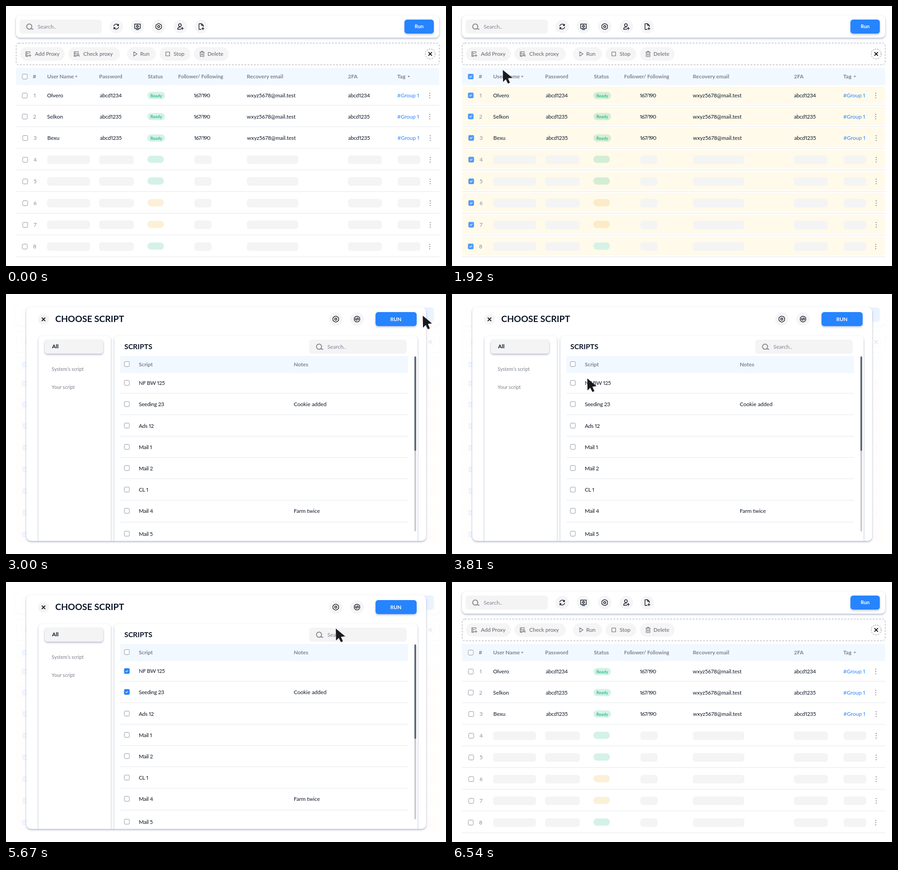
These frames come from a looping animation (974x575 px, 6750 ms). An HTML page:

```html
<!DOCTYPE html>
<html lang="en">
<head>
<meta charset="utf-8">
<title>Account table</title>
<style>
html, body { margin: 0; width: 100%; height: 100%; overflow: hidden; background: #fff; }
svg { display: block; width: 974px; height: 575px; font-family: Lato, "Open Sans", sans-serif; font-variant-numeric: proportional-nums; }
.card { filter: drop-shadow(0 2px 2px rgba(60, 78, 140, .42)); }
.btn { filter: drop-shadow(0 2px 2px rgba(50, 80, 150, .35)); }
.ico { fill: none; stroke: #101828; stroke-width: 1.4; stroke-linecap: round; stroke-linejoin: round; }
.thin { stroke: #5b6270; stroke-width: 1.1; }
.thick { stroke-width: 2; }
.tint { mix-blend-mode: multiply; }
</style>
</head>
<body>
<svg id="stage" viewBox="0 0 974 575"></svg>
<script>
const INK = '#0b1628', GREY = '#7b8494', SOFT = '#f4f4f4', BLUE = '#2684ff', HEAD = '#f2f8ff';

// Drawing helpers
const rect = (x, y, w, h, r, fill, more = '') =>
  `<rect x="${x}" y="${y}" width="${w}" height="${h}" rx="${r}" fill="${fill}" ${more}/>`;
const text = (x, y, s, size = 12, fill = INK, more = '') =>
  `<text x="${x}" y="${y + size * .35}" font-size="${size}" fill="${fill}" ${more}>${s}</text>`;
const bold = (x, y, s, size, fill, more = '') => text(x, y, s, size, fill, 'font-weight="700" ' + more);
const circle = (x, y, r, fill, more = '') => `<circle cx="${x}" cy="${y}" r="${r}" fill="${fill}" ${more}/>`;
const line = (x1, x2, y) => `<path d="M${x1} ${y}H${x2}" stroke="#e4e6ea"/>`;
const icon = (x, y, d, cls = '') => `<path class="ico ${cls}" transform="translate(${x} ${y})" d="${d}"/>`;
const box = (x, y) => rect(x - 5.5, y - 5.5, 11, 11, 2, '#fff', 'stroke="#8d949e"');
const tick = (x, y, fill) => rect(x - 6, y - 6, 12, 12, 2, fill) +
  `<path d="M${x - 2.6} ${y}l1.9 1.8 3.3-3.5" fill="none" stroke="#fff" stroke-width="1.2"/>`;
const ring = (r, x = 0, y = 0) => `M${x - r} ${y}a${r} ${r} 0 1 0 ${2 * r} 0a${r} ${r} 0 1 0 ${-2 * r} 0`;
const arrow = x => `<path d="M${x} 154.5h5l-2.5 3.5z" fill="${GREY}"/>`;
const MID = 'text-anchor="middle"', TIGHT = 'letter-spacing="-.25"';

const GEAR = 'M-1.6-6.2Q0-7 1.6-6.2L5-4.2Q6.3-3.3 6.3-1.8V1.8Q6.3 3.3 5 4.2L1.6 6.2Q0 7-1.6 6.2L-5 4.2Q-6.3 3.3-6.3 1.8V-1.8Q-6.3-3.3-5-4.2Z' + ring(2.3);
const CROSS = 'M-3.4-3.4L3.4 3.4M3.4-3.4L-3.4 3.4';
const SERVER = 'M4-5H-5V-1H2M-5-1V3.5H2M-5 3.5V5.5H0M-3-3h1M-3 1.2h1';
const search = (x, y) => `<path d="${ring(5.7, x - .5, y)}M${x + 3} ${y + 4.7}l5 1" fill="none" stroke="#868b95" stroke-width="2" stroke-linecap="round"/>` +
  text(x + 18, y + .5, 'Search..', 12, GREY);

// Toolbar
const tools = [
  [244, 'M-5.4-1.2A5.5 5.5 0 0 1 4.8-2.6M5.2-5.2V-2.3H2.3M5.4 1.2A5.5 5.5 0 0 1-4.8 2.6M-5.2 5.2V2.3H-2.3'],
  [291, 'M-6.3-5.5H6.3V4H-6.3ZM-3 6.5H3' + ring(1.9, 0, -.8) + 'M0-3.6V-2.8M0 1.2V2M-2.6-.8h-.5M2.6-.8h.5'],
  [338, GEAR],
  [386, ring(3.1, -1, -3.2) + 'M1 6H-6C-6 1-2 1 0 1.4M4.2 1.5V6.5M1.7 4H6.7'],
  [432, 'M0 6.3H-4.7V-6.3H1.2L4.8-2.8V0M1-6V-2.5H4.6M3.8 2V7M1.3 4.5H6.3']
];
const actions = [
  [31, 99, 64, 'Add Proxy', SERVER + 'M4 1V6M1.5 3.5H6.5M4-5V-2'],
  [138, 114, 171, 'Check proxy', SERVER + ring(2, 3.5, 2) + 'M5 3.6L6.5 5.2M4-5V-2'],
  [268, 64, 297, 'Run', 'M-3.2-4.8L4 0-3.2 4.8Z'],
  [340, 68, 371, 'Stop', 'M-4.2-4.2H4.2V4.2H-4.2Z'],
  [416, 77, 446, 'Delete', 'M-5-3.8H5M-2-3.8V-5.6H2V-3.8M-4-3.8V5.8H4V-3.8M-1.4-1V3.2M1.4-1V3.2']
];
const bar = rect(22, 21, 937, 49, 9, '#fff', 'class="card"') + rect(30, 30, 182, 31, 6, SOFT) + search(52, 45.5) +
  tools.map(([x, d]) => circle(x, 45.5, 15, '#f5f5f5') + icon(x, 45.5, d)).join('') +
  rect(882, 30, 65, 31, 6, BLUE, 'class="btn"') + bold(914.5, 45.5, 'Run', 11, '#fff', MID) +
  rect(22.5, 82, 936.5, 48, 6, 'none', 'stroke="#9a9da3" stroke-dasharray="4 3"') +
  actions.map(([x, w, tx, s, d]) => rect(x, 91, w, 30, 15, '#f5f5f5') + icon(x + 18, 106, d, 'thin') + text(tx, 106, s, 12, '#5b6270')).join('') +
  circle(939, 106, 11, '#fff', 'stroke="#777" stroke-dasharray="3 2.4"') + icon(939, 106, CROSS, 'thick');

// Account table
const rows = [198, 244.5, 292, 340, 388, 436, 484, 532];
const edges = [175, 219.5, 267, 315, 362.5, 410.5, 458.5, 506.5, 554.5];
const people = [['Olvero', 'abcd1234'], ['Selkon', 'abcd1235'], ['Bexu', 'abcd1235']];
const shift = i => i > 1 && i < 7 ? 1 : 0;
const titles = [[59, '#'], [91, 'User Name'], [206, 'Password'], [314, 'Status'], [381, 'Follower/ Following', 11.3],
  [533, 'Recovery email'], [757, '2FA'], [866, 'Tag']];
const bones = [[91, 95], [206, 77], [417, 38], [533, 114], [757, 75], [867, 50]];

function accountRow(y, i) {
  const dx = shift(i), p = people[i];
  let s = line(22, 959, edges[i + 1]) + box(41.5 + dx, y) + text(63.5 + dx, y, i + 1, 12, '#858c97', MID);
  for (const k of [-5, 0, 5]) s += circle(938 + dx, y + k, 1.1, '#6d7480');
  if (!p) {
    s += bones.map(([x, w]) => rect(x, y - 9.5, w, 19, 6, SOFT)).join('');
    return s + rect(313, y - 9, 36.5, 16, 8, i == 5 || i == 6 ? '#fcf0d8' : '#d5f2e8', i < 7 ? 'class="tint"' : '');
  }
  const x = i == 2 ? .5 : 0;
  return s + text(91 + x, y, p[0]) + text(207.5 + x, y, p[1], 12, INK, TIGHT) +
    rect(313, y - 8, 39, 16, 8, '#d5f2e8', 'class="tint"') + bold(332.5, y + .3, 'Ready', 9.5, '#35bd8d', MID) +
    text(433.5 + x, y, '167/190', 12, INK, MID + ' letter-spacing="-.9"') + text(533 + x, y, 'wxyz5678@mail.test') +
    text(757 + x, y, p[1], 12, INK, TIGHT) + text(866 + x, y, '#Group 1', 12, BLUE);
}
const yellow = rows.map((_, i) => rect(22, edges[i] + 3, 937, edges[i + 1] - edges[i] - 6, 6, '#fffaea')).join('');
const ticks = tick(41.5, 156, '#4e9bff') + rows.map((y, i) => tick(41.5 + shift(i), y - .5, '#4e9bff')).join('');
const table = rect(22, 137, 937, 38, 0, HEAD) + box(41.5, 156) +
  titles.map(([x, s, size = 12]) => bold(x, 156, s, size, GREY)).join('') + arrow(153) + arrow(889) +
  `<g id="yellow">${yellow}</g>` + rows.map(accountRow).join('') + `<g id="ticks">${ticks}</g>`;

// Script dialog
const scripts = [['NF BW 125', 197], ['Seeding 23', 244, 'Cookie added'], ['Ads 12', 291.5], ['Mail 1', 338.5],
  ['Mail 2', 385.5], ['CL 1', 433], ['Mail 4', 480, 'Farm twice'], ['Mail 5', 530.5]];
const dividers = [219.5, 267, 314.5, 361.5, 408.5, 456, 504.5];
const dialog = rect(0, 0, 974, 575, 0, '#fff', 'opacity=".9"') + rect(45, 29, 885, 517, 10, '#fff', 'class="card"') +
  '<clipPath id="clip"><rect x="45" y="29" width="885" height="517" rx="10"/></clipPath><g clip-path="url(#clip)">' +
  circle(83, 56, 12, '#f5f5f5') + icon(83, 56, CROSS, 'thick') + bold(109, 55.5, 'CHOOSE SCRIPT', 19.6, INK) +
  circle(730, 55.5, 15, '#f5f5f5') + icon(730, 55.5, GEAR) + circle(777, 55.5, 15, '#f5f5f5') +
  icon(777, 55.5, ring(6.3) + 'M-2-2L-4 0-2 2M2-2L4 0 2 2M.8-2.8L-.8 2.8') +
  rect(818, 40, 91, 31, 6, BLUE, 'class="btn"') + bold(863, 55.5, 'RUN', 11.5, '#fff', MID) +
  rect(72, 93, 160, 480, 8, '#fff', 'class="card"') + rect(240, 93, 671, 480, 8, '#fff', 'class="card"') +
  rect(86, 101, 129, 31, 6, SOFT, 'class="card"') + bold(102, 116, 'All', 12, INK) +
  text(101, 166.5, 'System’s script', 11, '#7d838d') + text(101, 206.5, 'Your script', 11, '#7d838d') +
  bold(262, 116.5, 'SCRIPTS', 15.8, INK) + rect(671, 101, 216, 31, 6, SOFT) + search(693.5, 116.5) +
  rect(253, 137, 637, 38, 0, HEAD) + box(267.5, 155) + bold(294, 155.5, 'Script', 12, GREY) + bold(637, 155.5, 'Notes', 12, GREY) +
  dividers.map(y => line(253, 890, y)).join('') +
  scripts.map(([s, y, note = '']) => box(267.5, y - .5) + text(294, y, s, 12, INK, TIGHT) + text(637, y, note)).join('') +
  rect(904, 138, 4, 387, 2, '#cbcdd1') + rect(904, 138, 4, 209, 2, '#5f6b7b') +
  `<g id="first">${tick(267.5, 197, BLUE)}</g><g id="second">${tick(267.5, 243, BLUE)}</g></g>`;

const $ = id => document.getElementById(id);
$('stage').innerHTML = bar + table + `<g id="dialog">${dialog}</g>` +
  '<path id="cursor" d="M0 0L.6 26.5 6.6 20.5 11.4 30 15.8 28 11.4 18.3 20.5 17Z" fill="#1b1b1f"/>';

// Standard "ease" curve, cubic-bezier(.25, .1, .25, 1)
function ease(x) {
  if (x <= 0 || x >= 1) return x <= 0 ? 0 : 1;
  const curve = (u, a, b) => 3 * (1 - u) ** 2 * u * a + 3 * (1 - u) * u * u * b + u ** 3;
  let lo = 0, hi = 1;
  for (let i = 0; i < 24; i++) {
    const mid = (lo + hi) / 2;
    if (curve(mid, .25, .25) < x) lo = mid; else hi = mid;
  }
  return curve(lo, .1, 1);
}

// Cursor moves: start, duration, goal x, goal y
const moves = [[325, 900, 39, 150], [1838, 900, 922.5, 48], [3160, 900, 267, 194], [4500, 300, 268, 243], [5268, 900, 888, 55]];

function draw(now) {
  const t = now % 6750, step = (start, length) => ease((t - start) / length);
  let x = 548, y = 460;
  for (const [start, length, gx, gy] of moves) {
    const p = step(start, length);
    x += (gx - x) * p;
    y += (gy - y) * p;
  }
  const stay = 1 - step(6160, 370);
  const show = (id, p) => $(id).setAttribute('opacity', p);
  $('cursor').setAttribute('transform', `translate(${x} ${y})`);
  show('cursor', step(5, 300) * stay);
  show('ticks', step(1225, 300) * stay);
  show('yellow', step(1430, 390) * stay);
  show('dialog', step(2735, 265) * stay);
  show('first', step(4060, 290));
  show('second', step(4800, 300));
  requestAnimationFrame(draw);
}
requestAnimationFrame(draw);
</script>
</body>
</html>
```
